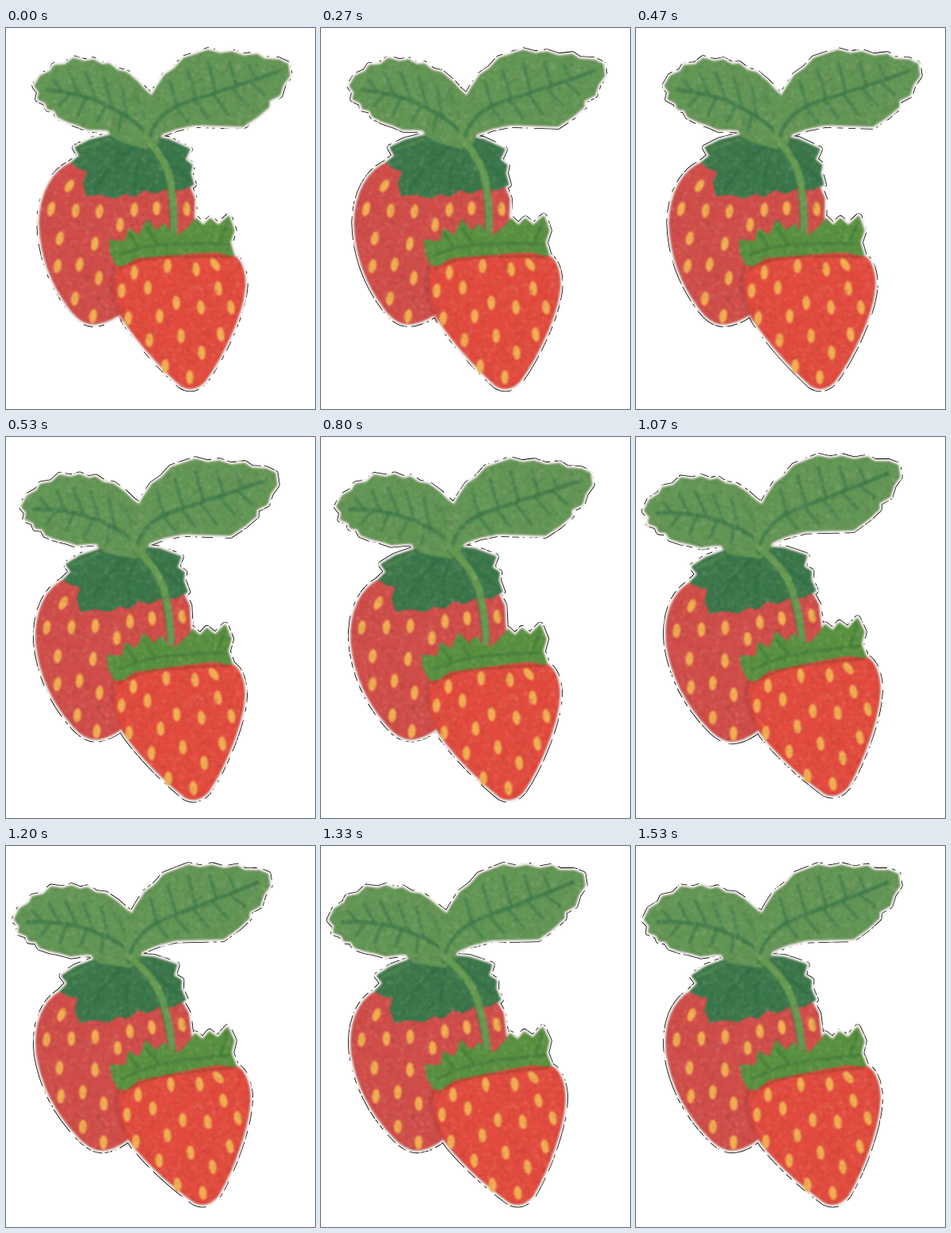
Animation, 390 px wide and 480 px high, one loop 1.59 s. Source, as an HTML page with a canvas:

```html
<!DOCTYPE html>
<html lang="en">
<head>
<meta charset="utf-8">
<title>Strawberries</title>
<style>
  html, body { margin: 0; height: 100%; overflow: hidden; background: #fff; }
  canvas { display: block; }
</style>
</head>
<body>
<canvas id="stage" width="390" height="480"></canvas>
<script>
const W = 390, H = 480, LOOP = 1590, STEP = LOOP / 24;
const stage = document.getElementById('stage').getContext('2d');

// One matrix per pose for each part
const still = [1, 0, 0, 1, 0, 0];
const backMoves = [still, [1, -.08, .075, 1, -22.6, 16.6], [1, -.11, .14, 1, -37.7, 22.3]];
const frontMoves = [still, [1, -.055, .045, 1, -15.2, 15.2], [1, -.12, .09, 1, -23, 25]];
const leftMoves = [still, [1, -.1, .03, 1, -18.5, 18.3], [1, -.136, .07, 1, -30.7, 24.9]];
const rightMoves = [still, [1, 0, 0, 1, -16, 0], [1, -.057, 0, 1, -25, 10.4]];

const parts = [
  {
    moves: backMoves, fill: '#d04c48',
    shape: 'M84 170C60 180 44 207 43 245C44 290 60 325 80 352C90 366 100 373 112 372C135 370 150 355 160 345L236 260 237 215 225 185Z',
    lines: [['#a93a3b', 9, .4, 'M137 304Q129 335 148 366']],
    seeds: [80, 199, 57, 228, 88, 230, 118, 231, 162, 229, 190, 227, 228, 228, 68, 265, 112, 272,
      144, 248, 65, 300, 93, 298, 117, 315, 87, 341, 110, 363]
  },
  {
    moves: backMoves, fill: '#39774a',
    shape: 'M88 151 94 161 83 170 93 177 104 180 98 195 102 211 119 209 137 214 150 208 162 212 175 203 188 208 204 201 221 204 236 197 232 183 234 173 225 166 231 153 218 147 205 141 188 138 165 136 130 136 106 142Z',
    lines: [
      ['#27613d', 4, .35, 'M172 145Q140 160 112 203M175 150Q160 180 163 208M188 150Q212 170 230 192'],
      ['#5f9651', 4, .5, 'M128 140Q110 148 94 153']
    ]
  },
  {
    moves: leftMoves, fill: '#619654',
    shape: 'M37 73 44 61 57 55 61 48 75 47 85 39 99 43 110 41 121 47 130 46 140 54 152 57 165 68 175 79 184 87 190 112 190 140 178 152 160 147 141 141 133 135 130 128 119 127 104 127 90 121 78 117 66 111 62 103 53 101 51 94 41 89 43 81Z',
    lines: [
      ['#35744a', 5, .65, 'M52 78Q105 83 145 107T178 145'],
      ['#35744a', 4, .5, 'M70 79L60 65M91 83L81 58M113 88L101 57M134 100L124 64M153 113L146 73M80 83L67 98M102 87L91 109M126 97L115 118M146 109L142 129'],
      ['#3f7c4b', 6, .35, 'M161 82Q177 105 181 144']
    ]
  },
  {
    moves: rightMoves, fill: '#619654',
    shape: 'M184 87 191 75 201 60 214 51 225 39 240 34 255 29 270 33 285 31 300 36 317 34 326 40 344 41 355 46 357 60 349 71 345 84 331 91 331 99 317 111 299 123 270 122 240 121 215 126 196 133 188 150 174 145 176 110Z',
    lines: [
      ['#35744a', 5, .65, 'M343 55Q280 77 232 92T180 146'],
      ['#35744a', 4, .5, 'M315 64L307 47M291 73L282 43M265 81L255 43M240 89L229 53M216 101L207 67M309 69L326 84M286 76L305 98M261 83L281 109M238 92L255 113M218 104L230 119']
    ]
  },
  {
    moves: backMoves, fill: '#39774a', shape: 'M172 138L178 136 186 143 181 148Z',
    lines: [['#659a51', 9, 1, 'M175 137Q203 166 208 195T212 258'], ['#3d7c43', 2, .5, 'M170 139Q198 167 203 198T207 257']]
  },
  {
    moves: frontMoves, fill: '#e24a3d',
    shape: 'M141 301C135 320 135 342 150 369Q178 411 221 450Q236 459 250 445C270 418 300 360 301 322Q300 292 283 285Q235 276 165 288Z',
    lines: [['#a53d2d', 4, .6, 'M144 303Q165 289 205 288T284 288'], ['#b93c34', 3, .3, 'M139 315Q134 340 154 375']],
    seeds: [162, 308, 204, 300, 240, 304, 264, 298, 179, 327, 268, 328, 146, 331, 215, 346, 246, 352, 284, 352,
      194, 363, 154, 366, 221, 388, 271, 386, 181, 393, 247, 409, 201, 426, 232, 440]
  },
  {
    moves: frontMoves, fill: '#57913f',
    shape: 'M131 267 150 270 155 253 168 262 178 242 190 256 200 247 207 258 218 262 232 250 240 241 249 250 258 241 268 250 281 238 287 255 282 270 287 287 265 282 240 283 214 285 190 287 165 289 148 299 139 298 132 283Z',
    lines: [['#38753a', 4, .5, 'M143 286Q175 273 212 272T281 272M178 252L190 271M156 259L167 276M280 246L270 268']]
  }
];
for (const part of parts) part.path = new Path2D(part.shape);

function randomizer(seed) {
  return () => (seed = (seed * 16807) % 2147483647) / 2147483647;
}

function layer() {
  const canvas = document.createElement('canvas');
  canvas.width = W;
  canvas.height = H;
  const ctx = canvas.getContext('2d');
  ctx.lineJoin = ctx.lineCap = 'round';
  return ctx;
}

function silhouette(ctx, pose, color, width) {
  ctx.fillStyle = ctx.strokeStyle = color;
  ctx.lineWidth = width;
  for (const part of parts) {
    ctx.setTransform(...part.moves[pose]);
    ctx.fill(part.path);
    ctx.stroke(part.path);
  }
  ctx.resetTransform();
}

function drawPart(ctx, part, pose) {
  ctx.setTransform(...part.moves[pose]);
  ctx.fillStyle = ctx.strokeStyle = part.fill;
  ctx.lineWidth = 2;
  ctx.fill(part.path);
  ctx.stroke(part.path);
  for (const [color, width, alpha, line] of part.lines) {
    ctx.strokeStyle = color;
    ctx.lineWidth = width;
    ctx.globalAlpha = alpha;
    ctx.stroke(new Path2D(line));
  }
  ctx.globalAlpha = 1;
  ctx.fillStyle = '#f2ad50';
  const seeds = part.seeds || [];
  for (let i = 0; i < seeds.length; i += 2) {
    const tilt = seeds[i + 1] < 200 ? .55 : seeds[i] === 264 ? -.6 : (200 - seeds[i]) / 600;
    ctx.beginPath();
    ctx.ellipse(seeds[i], seeds[i + 1], 4.8, 9, tilt, 0, 7);
    ctx.fill();
  }
  ctx.resetTransform();
}

function feltGrain(ctx) {
  const rand = randomizer(77);
  ctx.globalCompositeOperation = 'source-atop';
  for (let i = 0; i < 9000; i++) {
    ctx.fillStyle = i % 2 ? 'rgba(40,20,10,.07)' : 'rgba(255,235,200,.08)';
    ctx.fillRect(rand() * W, rand() * H, 2 + rand() * 2, 2 + rand() * 2);
  }
}

function picture(pose) {
  const art = layer(), out = layer();
  for (const part of parts) drawPart(art, part, pose);
  feltGrain(art);
  const halo = layer();
  silhouette(halo, pose, '#c9b8af', 3);
  out.filter = 'blur(2px)';
  out.drawImage(halo.canvas, 0, 0);
  out.filter = 'blur(1px)';
  out.drawImage(art.canvas, 0, 0);
  return out.canvas;
}

function ring(pose) {
  const ctx = layer();
  silhouette(ctx, pose, '#000', 9.4);
  ctx.globalCompositeOperation = 'destination-out';
  silhouette(ctx, pose, '#000', 7.8);
  return ctx.canvas;
}

const pictures = [0, 1, 2].map(picture);
const rings = [0, 1, 2].map(ring);
const edge = layer();

// The thin outline breaks up differently on every step
function drawEdge(pose, step) {
  const rand = randomizer(1000 + step * 7919);
  edge.globalCompositeOperation = 'copy';
  edge.drawImage(rings[pose], 0, 0);
  edge.globalCompositeOperation = 'destination-out';
  for (let i = step ? 2600 : 7000; i--;) {
    const size = 2 + rand() * 6;
    edge.fillRect(rand() * W, rand() * H, size, size);
  }
  stage.drawImage(edge.canvas, 0, 0);
}

let shown = '';
function frame(now) {
  const t = now % LOOP;
  const pose = t < 530 ? 0 : t < 1070 ? 1 : 2;
  const step = Math.floor(t / STEP);
  if (shown !== pose + ':' + step) {
    shown = pose + ':' + step;
    stage.fillStyle = '#fff';
    stage.fillRect(0, 0, W, H);
    stage.drawImage(pictures[pose], 0, 0);
    drawEdge(pose, step);
  }
  requestAnimationFrame(frame);
}
frame(performance.now());
</script>
</body>
</html>
```
